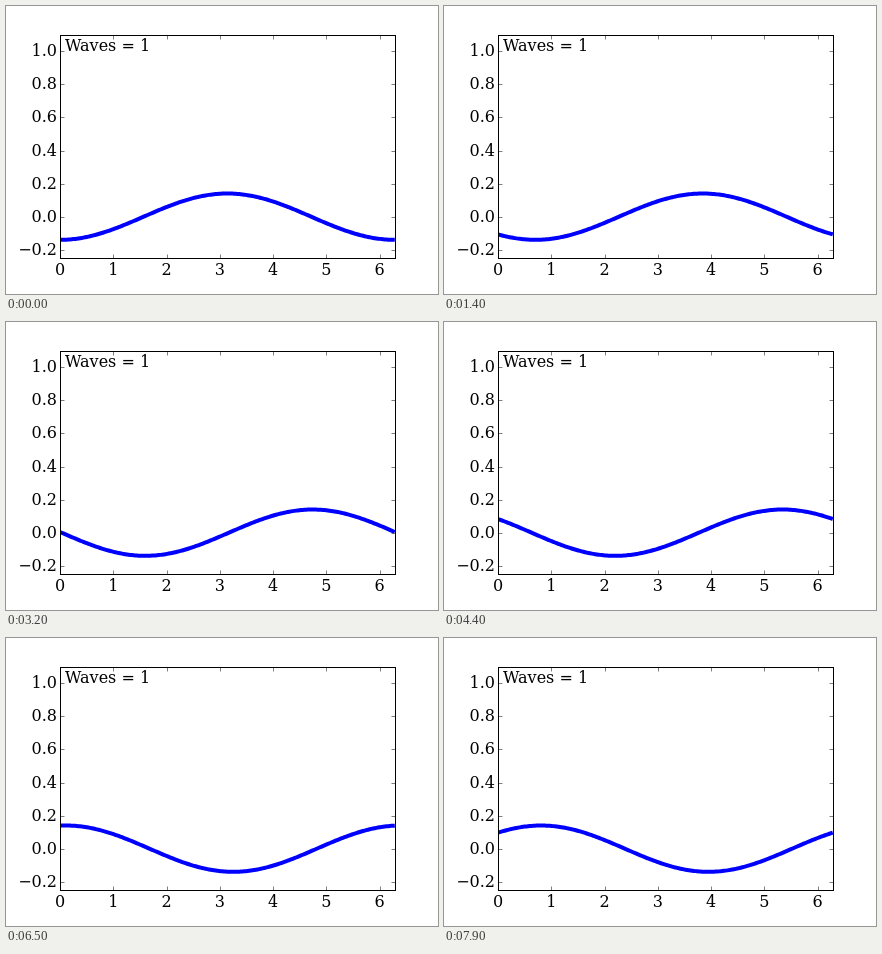
Animation of 432 by 288 pixels, one loop 8 s. Source, as an HTML page:

```html
<!DOCTYPE html>
<html lang="en">
<head>
<meta charset="utf-8">
<title>Travelling wave</title>
<style>
  html, body { margin: 0; width: 100%; height: 100%; overflow: hidden; background: #fff; }
  svg { display: block; width: 432px; height: 288px; }
  text { font: 16px "DejaVu Serif", "Noto Serif", serif; fill: #000; }
  .wave { fill: none; stroke: #00f; stroke-width: 4; }
  .tick { stroke: #000; stroke-opacity: .5; }
  .frame { fill: none; stroke: #000; }
</style>
</head>
<body>
<svg id="plot" viewBox="0 0 432 288">
  <clipPath id="area"><rect x="54" y="29" width="335" height="223"/></clipPath>
</svg>
<script>
const plot = document.getElementById('plot');
const LEFT = 54, RIGHT = 388.8, TOP = 28.8, BOTTOM = 252;
const X_MAX = 2 * Math.PI, Y_MIN = -0.25, Y_MAX = 1.1;
const STEP_MS = 100, STEPS = 80, SHIFT = 0.05, AMPLITUDE = 0.14;

const px = x => LEFT + x / X_MAX * (RIGHT - LEFT);
const py = y => BOTTOM - (y - Y_MIN) / (Y_MAX - Y_MIN) * (BOTTOM - TOP);
const snap = v => Math.round(v) + 0.5;

function add(tag, attrs, text = '') {
  const el = document.createElementNS('http://www.w3.org/2000/svg', tag);
  for (const key in attrs) el.setAttribute(key, attrs[key]);
  el.textContent = text;
  return plot.appendChild(el);
}

const tick = d => add('path', { class: 'tick', d });
const label = (x, y, anchor, text) => add('text', { x, y, 'text-anchor': anchor }, text);

const wave = add('path', { class: 'wave', 'clip-path': 'url(#area)' });

const x0 = snap(LEFT), x1 = snap(RIGHT), y0 = snap(TOP), y1 = snap(BOTTOM);

for (let i = 0; i <= 6; i++) {
  const x = snap(px(i));
  tick(`M${x} ${y1}v-4M${x} ${y0}v4`);
  label(px(i), 269, 'middle', i);
}

for (let i = -1; i <= 5; i++) {
  const value = i / 5, y = snap(py(value));
  tick(`M${x0} ${y}h4M${x1} ${y}h-4`);
  label(51, Math.round(py(value) + 5), 'end', value.toFixed(1).replace('-', '\u2212'));
}

add('rect', { class: 'frame', x: x0, y: y0, width: x1 - x0, height: y1 - y0 });
label(59, 45, 'start', 'Waves = 1');

function drawWave(phase) {
  const points = [];
  for (let i = 0; i <= 200; i++) {
    const x = X_MAX * i / 200;
    points.push(px(x).toFixed(2) + ' ' + py(-AMPLITUDE * Math.cos(x - phase)).toFixed(2));
  }
  wave.setAttribute('d', 'M' + points.join('L'));
}

let shown = -1;
const start = performance.now();

function update(now) {
  const step = Math.floor(Math.max(0, now - start) / STEP_MS) % STEPS;
  if (step !== shown) drawWave((shown = step) * SHIFT);
  requestAnimationFrame(update);
}
update(start);
</script>
</body>
</html>
```
